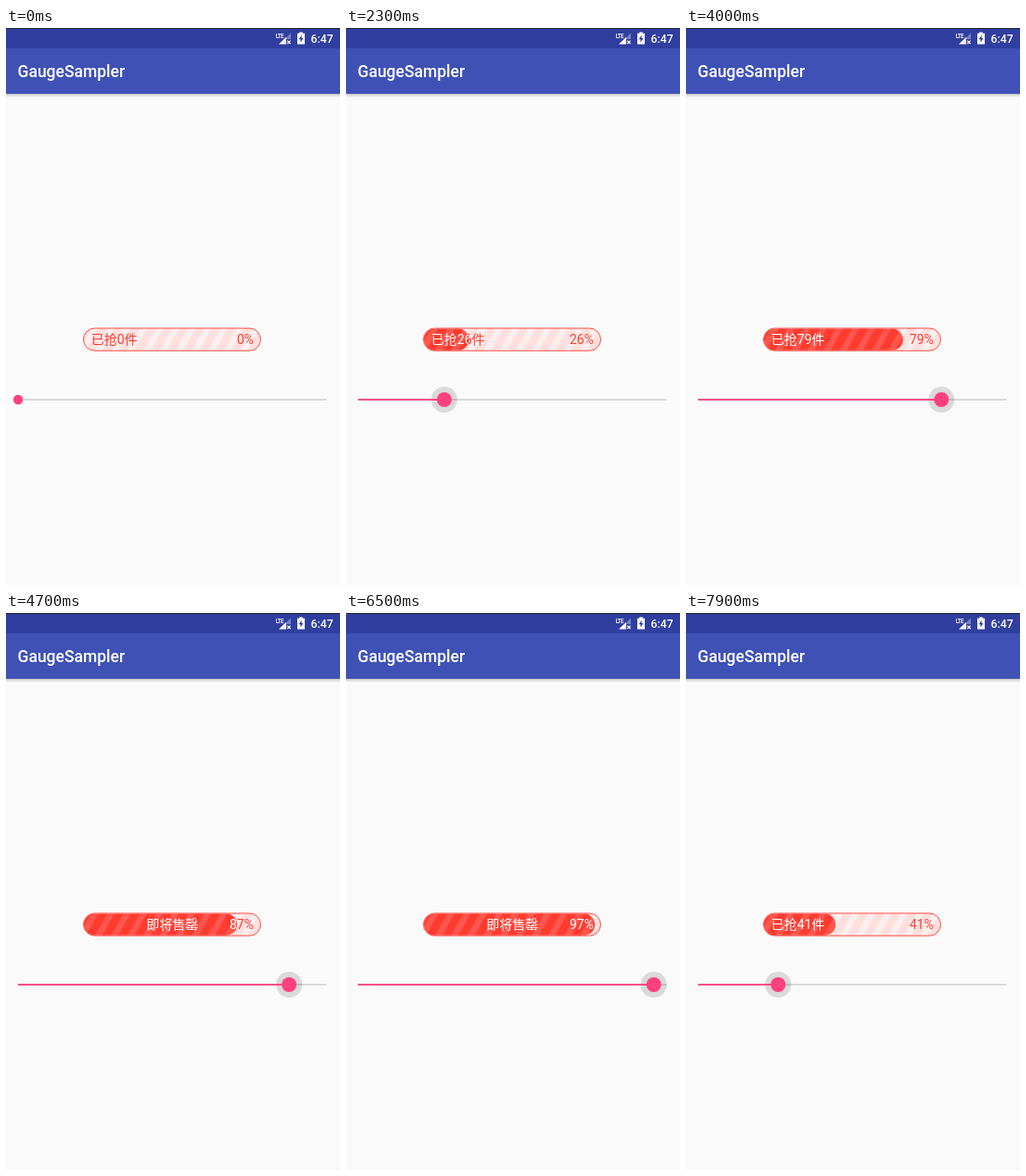
These frames come from a looping animation (360x601 px, 8 s). An HTML page:

```html
<!DOCTYPE html>
<html lang="zh-CN">
<head>
<meta charset="utf-8">
<title>GaugeSampler</title>
<style>
  html, body { margin: 0; width: 100%; height: 100%; overflow: hidden; background: #fafafa; }
  svg { display: block; width: 100vw; height: 100vh; }
  text { font-family: Roboto, "Noto Sans CJK SC", "Noto Sans CJK JP", "Noto Sans CJK", sans-serif; }
  .bar { font-size: 14px; }
  .head { fill: #fff; font-weight: 500; }
</style>
</head>
<body>
<svg viewBox="0 0 360 601" xmlns="http://www.w3.org/2000/svg">
  <defs>
    <linearGradient id="shade" x2="0" y2="1">
      <stop offset="0" stop-color="#000" stop-opacity=".25"/>
      <stop offset=".4" stop-color="#000" stop-opacity=".09"/>
      <stop offset="1" stop-color="#000" stop-opacity="0"/>
    </linearGradient>
    <pattern id="stripes" x="96" y="324" width="17.4" height="24" patternUnits="userSpaceOnUse">
      <path d="M0 24L13.5 0h7.5L7.5 24zM-17.4 24L-3.9 0h7.5L-9.9 24z" fill="#fff"/>
    </pattern>
    <clipPath id="filled"><rect id="fillShape" x="84" y="324.5" height="23.2"/></clipPath>
  </defs>

  <rect width="360" height="601" fill="#fafafa"/>
  <rect y="71" width="360" height="4.5" fill="url(#shade)"/>
  <rect y="22" width="360" height="49" fill="#3f51b5"/>
  <rect width="360" height="22" fill="#303f9f"/>
  <rect width="360" height="1" fill="#20242c"/>
  <text class="head" x="12.5" y="53" font-size="17.5">GaugeSampler</text>

  <text class="head" x="290.8" y="10.6" font-size="6.4" font-weight="700" letter-spacing="-.8">LTE</text>
  <path d="M307 5.5V12h-5v-1.5z" fill="#fff" opacity=".35"/>
  <path d="M294 17.5L302 9.7v7.8z" fill="#fff"/>
  <path d="M303.2 13.6l3.4 3.4m0-3.4l-3.4 3.4" stroke="#fff" stroke-width="1.2"/>
  <path d="M316.2 4.5h3.6v1.3h2.2v11.7h-8V5.8h2.2z" fill="#fff"/>
  <path d="M318.6 7.6l-2.9 4.7h1.8v3.4l2.9-4.8h-1.8z" fill="#303f9f"/>
  <text class="head" x="352.6" y="16.3" font-size="12.25" text-anchor="end">6:47</text>

  <rect x="83.5" y="324" width="191" height="24.2" rx="12.1" fill="#ffe0de"/>
  <rect x="83.5" y="324" width="191" height="24.2" rx="12.1" fill="url(#stripes)" opacity=".5"/>
  <rect x="83.5" y="324" width="191" height="24.2" rx="12.1" fill="none" stroke="#ff4a42"/>
  <g class="bar" fill="#ff3b30" id="labels">
    <text x="91.8" y="341" data-part="count"></text>
    <text x="179.3" y="341" text-anchor="middle" data-part="notice"></text>
    <text x="267" y="341" text-anchor="end" data-part="percent"></text>
  </g>
  <g clip-path="url(#filled)">
    <rect x="83" y="324" width="192" height="25" fill="#ff3b30"/>
    <rect x="83" y="324" width="192" height="25" fill="url(#stripes)" opacity=".14"/>
    <g class="bar" fill="#fff" id="litLabels"></g>
  </g>

  <circle id="halo" cy="401" r="14" fill="#000" opacity=".125"/>
  <rect x="13" y="400.1" width="332.5" height="1.8" fill="#000" opacity=".15"/>
  <rect id="track" x="13" y="400.1" height="1.8" fill="#ff4081"/>
  <circle id="thumb" cy="401" fill="#ff4081"/>
</svg>
<script>
  const LOOP = 8000, STEP = 100, PRESS = 1200;
  const LAG = 40; // the bar trails the finger

  const linear = u => u;
  const easeIn = power => u => u ** power;
  const easeOut = power => u => 1 - (1 - u) ** power;

  // the finger's moves, in percent of the track
  const DRAGS = [
    { from: PRESS, to: 2300, value: 28, ease: easeIn(2.3) },
    { from: 2300, to: 4300, value: 83.8, ease: easeOut(1.34) },
    { from: 4500, to: 4760, value: 89, ease: linear },
    { from: 4900, to: 5260, value: 98, ease: linear },
    { from: 5600, to: 5760, value: 100, ease: linear },
    { from: 6400, to: 6960, value: 72, ease: easeIn(1.07) },
    { from: 7300, to: 7700, value: 66, ease: linear },
    { from: 7700, to: 7900, value: 26, ease: easeIn(2.1) }
  ];

  const $ = id => document.getElementById(id);
  const clamp = u => Math.max(0, Math.min(1, u));
  const set = (id, attrs) => {
    for (const name in attrs) $(id).setAttribute(name, attrs[name]);
  };

  for (const label of $('labels').children) $('litLabels').append(label.cloneNode());

  function setLabel(part, value) {
    for (const el of document.querySelectorAll(`[data-part=${part}]`)) el.textContent = value;
  }

  function percentAt(time) {
    let percent = 0;
    for (const { from, to, value, ease } of DRAGS) {
      percent += (value - percent) * ease(clamp((time - from) / (to - from)));
    }
    return Math.round(percent);
  }

  function draw(time) {
    const x = 13 + 3.32 * percentAt(time);
    const sold = percentAt(time - LAG);
    const grip = clamp((time - PRESS) / (2 * STEP));

    set('halo', { cx: x, r: 14 * grip });
    set('thumb', { cx: x, r: 5.2 + 2.8 * grip });
    set('track', { width: x - 13 });

    const width = Math.max(0, 1.91 * sold - 1);
    const radius = Math.min(11.6, width / 2);
    set('fillShape', { width, rx: radius, ry: radius });

    setLabel('count', sold < 80 ? `已抢${sold}件` : '');
    setLabel('notice', sold < 80 ? '' : sold < 100 ? '即将售罄' : '已抢光');
    setLabel('percent', sold < 100 ? `${sold}%` : '');
  }

  const start = performance.now();
  function tick() {
    const time = (performance.now() - start) % LOOP;
    draw(Math.floor(time / STEP) * STEP);
    requestAnimationFrame(tick);
  }
  tick();
</script>
</body>
</html>
```
